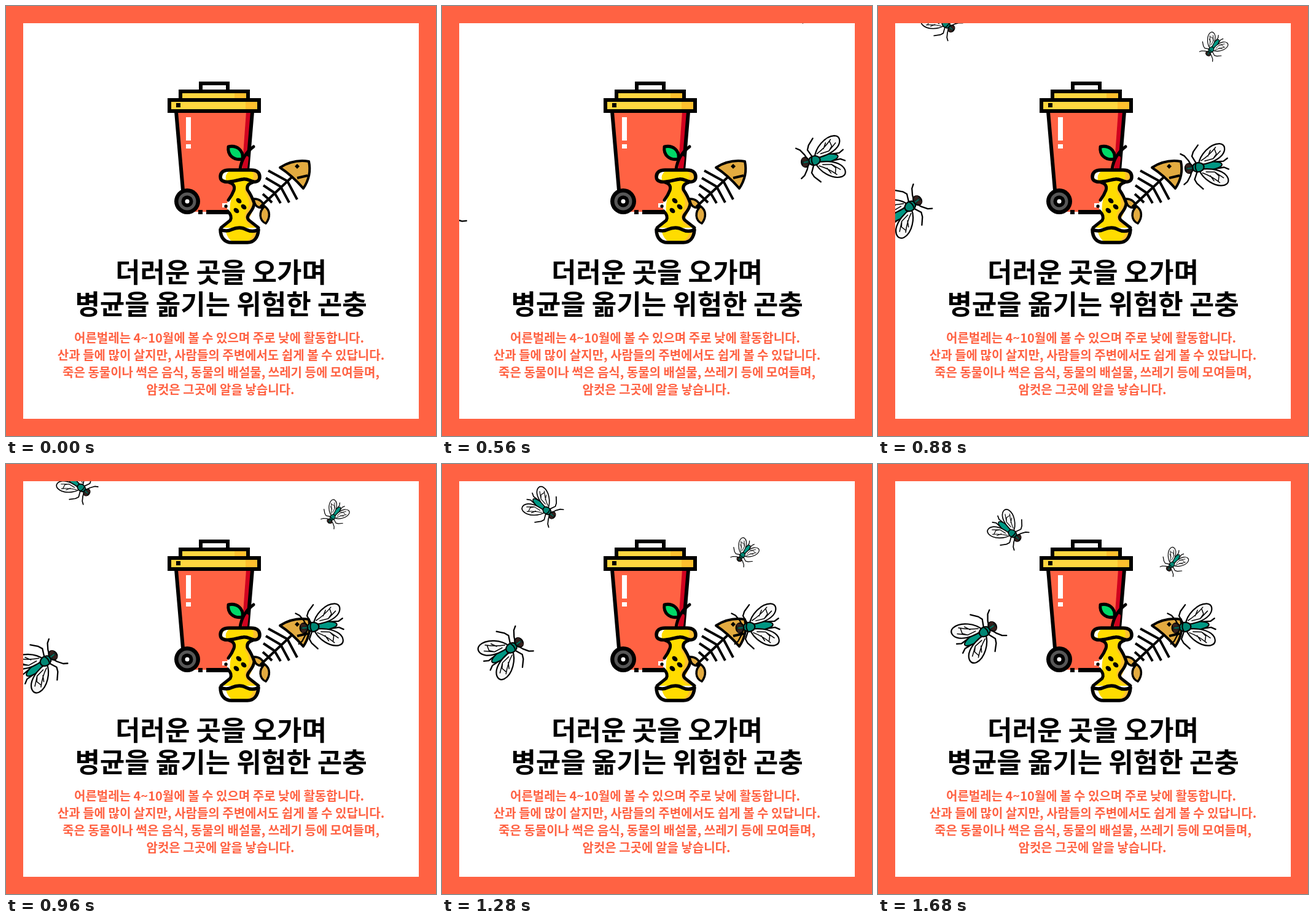
Write an HTML page with a canvas that moves like this. It is 700 by 700 pixels and loops after 2930 ms.

```html
<!DOCTYPE html>
<html lang="ko">
<head>
<meta charset="utf-8">
<style>
html, body { margin: 0; width: 100%; height: 100%; overflow: hidden; background: #fff; }
canvas { display: block; width: 700px; height: 700px; }
</style>
</head>
<body>
<canvas id="stage" width="700" height="700"></canvas>
<script>
const ctx = document.getElementById('stage').getContext('2d');
const LOOP = 2930, STEP = 80, LAST = 21;
const RED = '#ff6243', BLACK = '#000', WHITE = '#fff', CRIMSON = '#d0021f';
const YELLOW = '#ffd740', AMBER = '#ffc02e', GOLD = '#ffdc00', SAND = '#e3ab40';
const FONT = '"Noto Sans CJK KR", "Noto Sans CJK", "Noto Sans KR", sans-serif';

// End position of the head, travel per step, last moving step, heading, turn per step
const flies = [
  { x: 187, y: 264, vx: 12.2, vy: -5.2, end: 21, angle: -34, turn: 0.4, size: 1 },
  { x: 228, y: 121, vx: 12, vy: 9.3, end: 20, angle: 40, turn: 0, size: 0.75 },
  { x: 473, y: 171, vx: -10.7, vy: 15.5, end: 17, angle: 127, turn: 0, size: 0.53 },
  { x: 484, y: 267, vx: -21.3, vy: 2.5, end: 12, angle: 174, turn: 0.9, size: 1 }
];

function shape(d, fill, line, width) {
  const p = new Path2D(d);
  if (fill) { ctx.fillStyle = fill; ctx.fill(p); }
  if (line) { ctx.strokeStyle = line; ctx.lineWidth = width; ctx.stroke(p); }
}

function rect(x, y, w, h, fill) {
  ctx.fillStyle = fill;
  ctx.fillRect(x, y, w, h);
}

function frameRect(x, y, w, h) {
  ctx.strokeStyle = BLACK;
  ctx.lineWidth = 6;
  ctx.strokeRect(x, y, w, h);
}

function oval(x, y, rx, ry, fill, turn = 0, width = 0) {
  ctx.beginPath();
  ctx.ellipse(x, y, rx, ry, turn, 0, Math.PI * 2);
  ctx.fillStyle = fill;
  ctx.fill();
  if (width) { ctx.strokeStyle = BLACK; ctx.lineWidth = width; ctx.stroke(); }
}

function drawBin() {
  ctx.lineCap = 'butt';
  ctx.lineJoin = 'miter';
  shape('M277 172H401L388 335H290Z', RED);
  shape('M391 172H400L392 270H384Z', CRIMSON);
  shape('M277 172L288 300M401 172L393 268', null, BLACK, 6);
  rect(293, 181, 8, 38, WHITE);
  rect(293, 225, 8, 7, WHITE);
  rect(352, 321, 8, 7, WHITE);

  rect(317, 126, 44, 13, WHITE);
  frameRect(317, 126, 44, 13);
  rect(284, 139, 110, 14, YELLOW);
  rect(372, 139, 22, 14, AMBER);
  frameRect(284, 139, 110, 14);
  rect(266, 153, 146, 18, YELLOW);
  rect(390, 153, 22, 18, AMBER);
  frameRect(266, 153, 146, 18);
  rect(277, 158, 7, 7, BLACK);

  rect(313, 332, 7, 7, BLACK);
  rect(326, 332, 42, 7, BLACK);
  oval(295, 318, 21, 21, BLACK);
  oval(295, 318, 14.5, 14.5, '#575757');
  oval(295, 318, 9.5, 9.5, BLACK);
  oval(295, 318, 3.5, 3.5, WHITE);
}

function drawFish() {
  ctx.lineCap = 'butt';
  ctx.lineJoin = 'round';
  shape('M403 314C412 313 419 319 420 327C411 331 404 325 403 314Z', SAND, BLACK, 3.5);
  shape('M421 326C431 333 430 345 423 354C412 349 411 335 421 326Z', SAND, BLACK, 3.5);
  shape('M468 276L414 327M427 268L458 285L474 315M423 280L447 294L461 320' +
    'M419 292L437 304L447 321M418 306L427 314L433 320', null, BLACK, 4);
  shape('M446 263Q468 249 493 253Q498 276 484 297Q466 276 446 263Z', SAND, BLACK, 4);
  shape('M474 280L491 276', null, BLACK, 4);
  shape('M474 257L478 261L474 265L470 261Z', BLACK);
}

function drawApple() {
  const cap = 'M349 278C349 270 355 267 363 267H399C408 267 413 271 413 278' +
    'C413 284 409 287 403 286C396 284 392 281 386 282C376 283 366 288 356 286C351 285 349 282 349 278Z';
  const core = 'M362 287Q374 290 371 300Q368 309 361 318Q358 325 361 333' +
    'Q369 342 365 349L350 361H411L397 350Q390 345 396 338Q404 328 404 321' +
    'Q400 309 393 299Q391 290 402 287Q382 279 362 287Z';
  const base = 'M349 364Q359 368 367 364Q381 358 391 364Q401 369 411 364' +
    'C410 378 403 385 393 385H367C356 385 349 377 349 364Z';

  ctx.lineCap = 'round';
  ctx.lineJoin = 'round';
  shape('M389 264L391 248', null, CRIMSON, 8);
  shape('M381 266Q384 243 403 229', null, BLACK, 5);
  shape('M362 229C376 226 387 235 385 249C371 252 360 243 362 229Z', '#00d967', BLACK, 5);

  shape(core, GOLD);
  shape('M394 288Q384 299 393 309Q399 321 392 333Q383 345 398 358L411 361L395 347Q404 332 404 321L393 299Z', AMBER);
  shape('M369 306L361 318Q358 325 361 333L365 338Q363 322 369 306Z', WHITE);
  shape('M363 287Q374 290 371 300Q368 308 362 316M361 334Q369 342 365 349L350 361' +
    'M411 361L397 350Q390 345 396 338Q404 328 404 321Q400 309 393 299Q391 290 402 287', null, BLACK, 5);
  oval(358, 326, 2.7, 2.7, BLACK);

  shape(cap, GOLD);
  shape('M398 267C409 266 413 271 413 279C412 286 407 287 400 284Q407 275 398 267Z', AMBER);
  shape('M363 269Q351 270 352 281L358 283Q356 275 363 269Z', WHITE);
  shape(cap, null, BLACK, 5.5);
  shape(base, GOLD);
  shape('M403 367L411 364C410 378 403 385 393 385H387Q401 380 403 367Z', AMBER);
  shape('M352 367L358 368Q361 379 368 383Q353 382 352 367Z', WHITE);
  shape(base, null, BLACK, 5.5);

  for (const [x, y] of [[379, 317], [387, 327], [375, 333]]) oval(x, y, 5, 3.5, BLACK, 0.7);
}

// Faces along +x, head at the local zero point
function drawFly(fly, step) {
  const left = Math.max(0, fly.end - step);
  ctx.save();
  ctx.translate(fly.x - fly.vx * left, fly.y - fly.vy * left);
  ctx.rotate((fly.angle - fly.turn * left) * Math.PI / 180);
  ctx.scale(fly.size, fly.size);
  ctx.lineCap = ctx.lineJoin = 'round';

  const sides = draw => [1, -1].forEach(side => {
    ctx.save();
    ctx.scale(1, side);
    draw();
    ctx.restore();
  });

  sides(() => shape('M-5 5L-2 12L4 21L10 25M-14 6L-8 19L-11 26L-20 36M-34 6L-58 5L-65 9', null, BLACK, 2.3));
  oval(-35, 0, 20, 6.5, '#009884', 0, 2);
  sides(() => {
    shape('M-17 4C-21 20 -40 36 -55 34C-65 32 -64 22 -57 15C-47 6 -30 3 -17 4Z', '#f8f8f8', BLACK, 2.2);
    shape('M-22 10Q-36 17 -48 29M-34 16L-39 25M-28 9L-42 11L-55 22M-42 11L-48 18L-46 26', null, BLACK, 1.5);
  });
  oval(-16, 0, 9.5, 7.5, '#008673', 0, 2.2);
  shape('M-13 -6Q-10 0 -13 6', null, BLACK, 2);
  oval(-1, 0, 6.5, 8, '#17211f', 0, 2);
  sides(() => oval(0, 4.5, 4, 3, '#35201d', 0.3));
  shape('M-5 0H1', null, '#00705f', 2);
  ctx.restore();
}

function drawText() {
  ctx.textAlign = 'center';
  ctx.textBaseline = 'alphabetic';
  ctx.fillStyle = BLACK;
  ctx.font = '700 44px ' + FONT;
  ctx.fillText('더러운 곳을 오가며', 350, 450);
  ctx.fillText('병균을 옮기는 위험한 곤충', 350, 502);
  ctx.fillStyle = RED;
  ctx.font = '700 20px ' + FONT;
  ctx.fillText('어른벌레는 4~10월에 볼 수 있으며 주로 낮에 활동합니다.', 347, 548);
  ctx.fillText('산과 들에 많이 살지만, 사람들의 주변에서도 쉽게 볼 수 있답니다.', 350, 576);
  ctx.fillText('죽은 동물이나 썩은 음식, 동물의 배설물, 쓰레기 등에 모여들며,', 350, 604);
  ctx.fillText('암컷은 그곳에 알을 낳습니다.', 349, 632);
}

const start = performance.now();

function render() {
  const time = (performance.now() - start) % LOOP;
  const step = Math.min(LAST, Math.floor(time / STEP));
  rect(0, 0, 700, 700, RED);
  rect(28, 28, 644, 644, WHITE);
  drawBin();
  drawFish();
  drawApple();
  ctx.save();
  ctx.beginPath();
  ctx.rect(28, 28, 644, 644);
  ctx.clip();
  if (step > 2) flies.forEach(fly => drawFly(fly, step));
  ctx.restore();
  drawText();
  requestAnimationFrame(render);
}
render();
</script>
</body>
</html>
```
